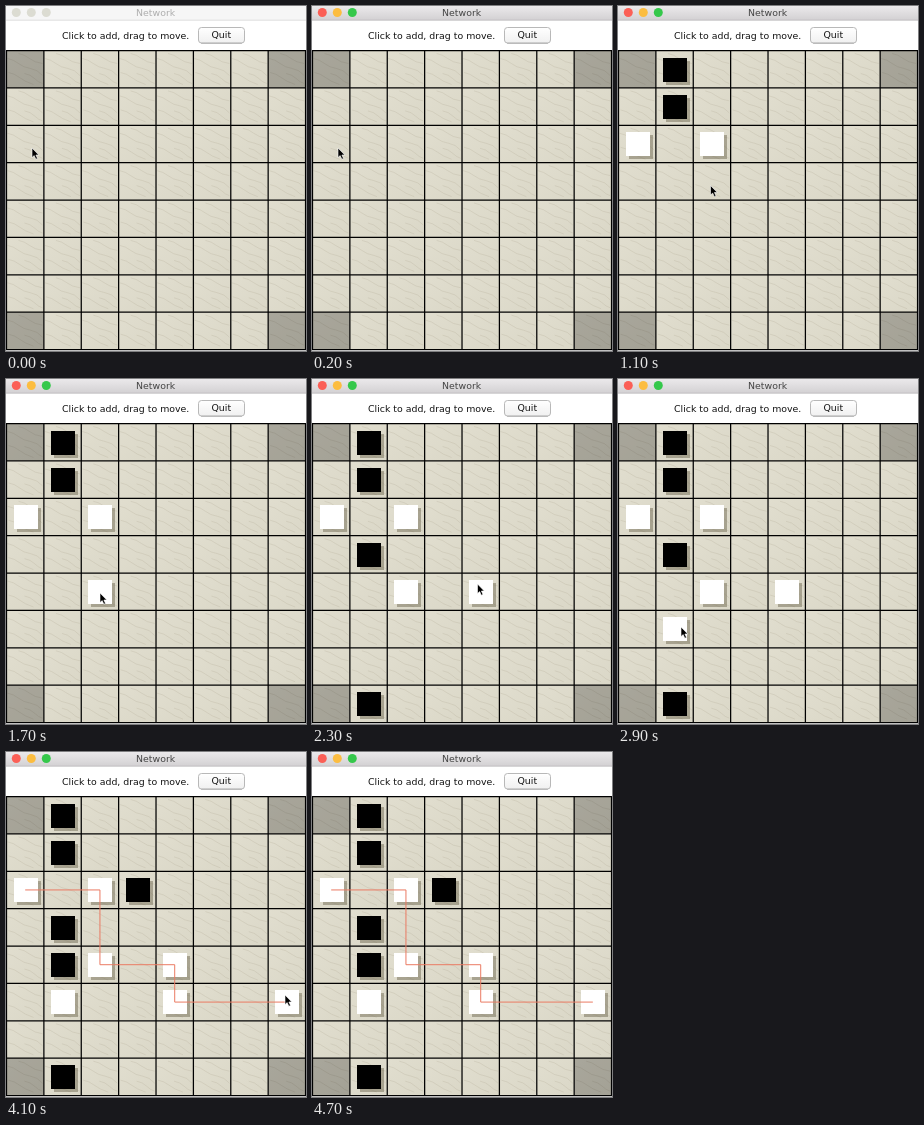
Animation of 300 by 345 pixels, one loop 4.8 s. Source, as an HTML page:

```html
<!DOCTYPE html>
<html lang="en">
<head>
<meta charset="utf-8">
<title>Network</title>
<style>
  html, body { margin: 0; width: 100%; height: 100%; overflow: hidden; background: #fff; }
  svg { display: block; width: 300px; height: 345px; }
  text { font: 9.4px "DejaVu Sans", "Open Sans", sans-serif; fill: #111; }
</style>
</head>
<body>
<svg id="stage" viewBox="0 0 300 345">
  <defs>
    <linearGradient id="bar" x2="0" y2="1">
      <stop stop-color="#ebe9eb"/><stop offset="1" stop-color="#d3d1d3"/>
    </linearGradient>
    <linearGradient id="btn" x2="0" y2="1">
      <stop stop-color="#fff"/><stop offset="1" stop-color="#f0f0f0"/>
    </linearGradient>
    <linearGradient id="stone" x2="1" y2="1">
      <stop stop-color="#e1decf"/><stop offset="1" stop-color="#dad7c7"/>
    </linearGradient>
    <g id="tile">
      <rect width="37.4" height="37.4" fill="url(#stone)"/>
      <g fill="none" stroke="#aaa58d" stroke-opacity=".3" stroke-width=".8">
        <path d="M1 8Q7 9 12 13T24 18T36 25"/>
        <path d="M12 3Q18 4 23 8T36 13"/>
        <path d="M2 22Q8 23 13 27T27 34"/>
        <path d="M18 23Q24 24 28 28T36 33"/>
      </g>
    </g>
  </defs>
  <rect width="300" height="345" fill="#fff"/>
  <rect id="titlebar" width="300" height="14"/>
  <path id="edge" d="M0 14.2H300" stroke-width=".8"/>
  <g id="dots"></g>
  <text id="title" x="149.6" y="10" text-anchor="middle">Network</text>
  <text x="56" y="33">Click to add, drag to move.</text>
  <rect x="192.5" y="21.5" width="46" height="15.5" rx="3" fill="url(#btn)" stroke="#b0b0b0" stroke-width=".9"/>
  <path d="M195 37.3H236" stroke="#999" stroke-width=".6"/>
  <text x="215.3" y="32.4" text-anchor="middle">Quit</text>
  <g id="board"></g>
  <g id="pieces"></g>
  <path id="chain" fill="none" stroke="#ea7a62" stroke-width="1"/>
  <path id="cursor" d="M0 0V9.6L2.2 7.6 3.8 11.2 5.5 10.4 3.9 7H6.8Z" fill="#000" stroke="#fff" stroke-width=".6"/>
</svg>
<script>
const LOOP = 4800, STEP = 100, PITCH = 37.38, LEFT = 0.5, TOP = 44.5;
const $ = id => document.getElementById(id);
const cellX = c => LEFT + c * PITCH;
const cellY = r => TOP + r * PITCH;

function add(parent, tag, attrs) {
  const el = document.createElementNS("http://www.w3.org/2000/svg", tag);
  for (const k in attrs) el.setAttribute(k, attrs[k]);
  return parent.appendChild(el);
}
const show = (el, on) => el.setAttribute("visibility", on ? "visible" : "hidden");

// Board
for (let r = 0; r < 8; r++) for (let c = 0; c < 8; c++) {
  const x = cellX(c), y = cellY(r);
  add($("board"), "use", { href: "#tile", x, y });
  if (c % 7 === 0 && r % 7 === 0)
    add($("board"), "rect", { x, y, width: PITCH, height: PITCH, fill: "#000", "fill-opacity": 0.25 });
}
let grid = "";
for (let i = 0; i < 9; i++)
  grid += `M${cellX(i)} ${TOP}V${cellY(8)}M${LEFT} ${cellY(i)}H${cellX(8)}`;
add($("board"), "path", { d: grid, stroke: "#000", "stroke-width": 1.25, "stroke-linecap": "square" });

// Window buttons
const dotColors = ["#fb5f56", "#fcbd40", "#35c84b"];
const dots = dotColors.map((c, i) => add($("dots"), "circle", { cx: 10.3 + i * 15, cy: 6.5, r: 4.5 }));

// Moves: column, row, colour, time placed, time pressed
const moves = [
  [0, 2, "white", 400, 300], [1, 0, "black", 500],
  [2, 2, "white", 700, 600], [1, 1, "black", 800],
  [2, 4, "white", 1600, 1400], [1, 3, "black", 1800],
  [4, 4, "white", 2200, 2100], [1, 7, "black", 2300],
  [1, 5, "white", 2800, 2700], [1, 4, "black", 3000],
  [4, 5, "white", 3400, 3300], [3, 2, "black", 3500],
  [7, 5, "white", 3900, 3800]
].map(([c, r, fill, placed, pressed = placed]) => {
  const x = Math.round(cellX(c) + 7), y = Math.round(cellY(r) + 7);
  const solid = add($("pieces"), "g", {});
  add(solid, "rect", { x: x + 3, y: y + 3, width: 24, height: 24, fill: "#5d573f", "fill-opacity": 0.42 });
  add(solid, "rect", { x, y, width: 24, height: 24, fill });
  const ghost = add($("pieces"), "g", {});
  add(ghost, "path", { d: `M${x + 24} ${y + 2}h2v24h-24v-2h22z`, fill: "#6b6550", "fill-opacity": 0.45 });
  add(ghost, "rect", { x: x + 0.5, y: y - 0.5, width: 24, height: 24, fill: "#d5d2c2", "fill-opacity": 0.6, stroke: "#97917d", "stroke-width": 0.9 });
  return { solid, ghost, placed, pressed };
});

const CHAIN_AT = 4000, ACTIVE_AT = 200, CURSOR_END = 4500;
const mid = (c, r) => `${cellX(c + 0.5)} ${cellY(r + 0.5)}`;
$("chain").setAttribute("d", "M" +
  [[0, 2], [2, 2], [2, 4], [4, 4], [4, 5], [7, 5]].map(p => mid(...p)).join("L"));

// Pointer path: time, x, y
const path = [
  [0, 26, 142], [400, 26, 142], [600, 88.5, 142.5], [900, 90, 143], [1300, 95, 216],
  [1400, 94, 214], [1700, 94, 214], [1800, 112, 212], [2100, 165.5, 205],
  [2300, 165.5, 205], [2500, 148, 212], [2700, 63, 248], [3100, 63, 248],
  [3300, 165, 246], [3500, 168, 246], [3600, 259, 227], [3700, 275, 240],
  [3800, 279, 243], [CURSOR_END, 279, 243]
];
function pointer(t) {
  let i = 1;
  while (i < path.length - 1 && path[i][0] < t) i++;
  const [t0, x0, y0] = path[i - 1], [t1, x1, y1] = path[i];
  const k = Math.min(1, (t - t0) / (t1 - t0));
  return [x0 + (x1 - x0) * k, y0 + (y1 - y0) * k];
}

function render(now) {
  const t = Math.floor((now % LOOP) / STEP) * STEP;
  const active = t >= ACTIVE_AT;
  $("titlebar").setAttribute("fill", active ? "url(#bar)" : "#f6f6f6");
  $("edge").setAttribute("stroke", active ? "#b5b3b5" : "#d6d6d6");
  $("title").style.fill = active ? "#444" : "#aeaeae";
  dots.forEach((d, i) => d.setAttribute("fill", active ? dotColors[i] : "#dcdcd2"));
  for (const m of moves) {
    show(m.solid, t >= m.placed);
    show(m.ghost, t >= m.pressed && t < m.placed);
  }
  show($("chain"), t >= CHAIN_AT);
  show($("cursor"), t < CURSOR_END);
  $("cursor").setAttribute("transform", `translate(${pointer(t)})`);
}

const start = performance.now();
function tick() {
  render(performance.now() - start);
  requestAnimationFrame(tick);
}
tick();
</script>
</body>
</html>
```
